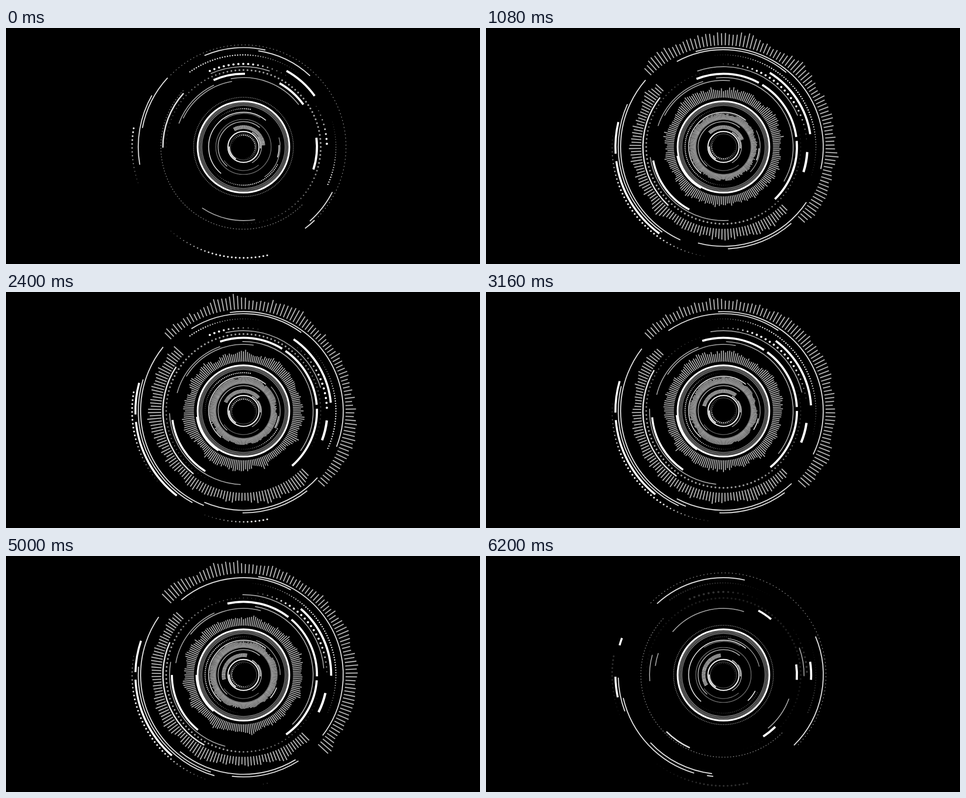
Write an HTML page with a canvas that moves like this. It is 1000 by 500 pixels and loops after 6.24 s.

```html
<!DOCTYPE html>
<html lang="en">
<head>
<meta charset="utf-8">
<title>Radial spectrum</title>
<style>
html, body { margin: 0; width: 100%; height: 100%; overflow: hidden; background: #000; }
canvas { display: block; width: 1000px; height: 500px; }
</style>
</head>
<body>
<canvas id="stage" width="1000" height="500"></canvas>
<script>
const LOOP = 6240, STEP = 40, SWEEP = 560, PULSE = 2040, LAST = LOOP - STEP;
const ctx = document.getElementById('stage').getContext('2d');
const rad = deg => deg * Math.PI / 180;
const clamp = v => Math.min(1, Math.max(0, v));
const smooth = v => v * v * (3 - 2 * v);
const mix = (a, b, k) => a + (b - a) * k;
let now = 0;

// grown: share of an arc drawn at the loop start; gone: share removed at its end.
const style = (width, color, grown, gone) => ({ width, color, grown, gone });
const SLOW = style(2.2, '#ddd', 0.3, 0.43);
const THIN = style(2.2, '#ddd', 0.5, 0.76);
const LONG = style(2.2, '#ddd', 0.5, 0.19);
const SHORT = style(2.2, '#ddd', 0.18, 0.91);
const FINE = style(1.9, '#a5a5a5', 0.5, 0.76);
const EARLY = style(1.9, '#a5a5a5', 0.81, 0);
const BOLD = style(4.5, '#fff', 0.5, 0.76);
const EDGE = style(4.2, '#fff', -0.145, 0.76);
const FRESH = style(4.2, '#fff', 0, 1);

function hash(a, b, seed) {
  const v = Math.sin(a * 127.1 + b * 311.7 + seed * 74.7) * 43758.5453;
  return v - Math.floor(v);
}

// Peaked along x, smooth in time; x wraps after n cells.
function noise(x, t, n, seed) {
  const i = Math.floor(x), j = Math.floor(t);
  const u = x - i, v = smooth(t - j);
  const at = p => mix(hash(p % n, j, seed), hash(p % n, j + 1, seed), v);
  return mix(at(i), at(i + 1), u);
}

function arc(r, from, to, width, color = '#fff') {
  ctx.beginPath();
  ctx.arc(0, 0, r, rad(Math.min(from, to)), rad(Math.max(from, to)));
  ctx.lineWidth = width;
  ctx.strokeStyle = color;
  ctx.stroke();
}

const ring = (r, width, color) => arc(r, 0, 360, width, color);

// An arc grows from its start angle, turns, and is cut from the start,
// or from the far end when it retreats.
function sweep(look, r, start, span, speed, retreat = false) {
  const head = clamp(look.grown + now / SWEEP);
  const cut = clamp(look.gone - (LAST - now) / SWEEP);
  const a = start + speed * now / 1000;
  const lo = retreat ? 0 : cut;
  const hi = retreat ? Math.min(head, 1 - cut) : head;
  if (hi > lo) arc(r, a + span * lo, a + span * hi, look.width, look.color);
}

// Spectrum bars every two degrees; flat bars remain as small dots.
function bars(r, start, count, width, reach, color = '#b0b0b0') {
  const level = smooth(clamp((now - 20) / 420)) * (1 - smooth(clamp((now - 5800) / 370)));
  ctx.beginPath();
  for (let i = 0; i < count; i++) {
    const a = rad(start + i * 2), c = Math.cos(a), s = Math.sin(a);
    const swell = noise(i / 5, now / 170, count / 5, r) ** 1.5;
    const spike = noise(i, now / 110, count, r + 5) ** 2;
    const end = r + 1.6 + level * reach * (0.38 + 0.45 * swell + 0.25 * spike);
    ctx.moveTo(c * r, s * r);
    ctx.lineTo(c * end, s * end);
  }
  ctx.lineWidth = width;
  ctx.strokeStyle = level < 0.1 ? '#777' : color;
  ctx.stroke();
}

// A soft window of brightness runs backwards along a row of dots.
function dots(r, start, span, pitch, light = 0.9) {
  const count = Math.round(rad(span) * r / pitch);
  const size = pitch * 0.35 + 1;
  const centre = 1.1 - now / PULSE;
  const fade = 1 - 0.8 * clamp((now - 5860) / 340);
  ctx.fillStyle = '#fff';
  for (let i = 0; i < count; i++) {
    const u = i / count;
    let d = u - centre;
    d = Math.abs(d - Math.round(d));
    const k = clamp((0.38 - d) / 0.24);
    if (k <= 0) continue;
    const a = rad(start + span * u);
    ctx.globalAlpha = light * fade * mix(0.2, 1, k);
    ctx.beginPath();
    ctx.arc(Math.cos(a) * r, Math.sin(a) * r, size * mix(0.45, 1, k) / 2, 0, 7);
    ctx.fill();
  }
  ctx.globalAlpha = 1;
}

function outerArcs() {
  sweep(SLOW, 210.5, 247, 119, 6.3);
  sweep(SLOW, 210.5, 27, 71, 6.3);
  sweep(SLOW, 217, 222.5, -106, -1.6);
  sweep(LONG, 206, 313, -68.5, -2.8);
  sweep(THIN, 222, 209.5, -78.5, -5, true);
  sweep(SHORT, 216, 46, 39, 2.3);

  sweep(EDGE, 228, 125, 46, 1.3);
  sweep(EDGE, 228, 175, 17, 1.3);

  // Three equal segments share one ring; the middle one repeats further out.
  for (let i = 0; i < 3; i++) sweep(BOLD, 155, 246 + 53.4 * i, 50.3, 2.28);
  sweep(BOLD, 185, 299.4, 49.7, 2.28);

  sweep({ ...THIN, width: 3 }, 170, 222, -85, -3.6);
  for (let i = 0; i < 2; i++) sweep(FINE, 156 + 14 * i, 81 + 165 * i, 86, 4.65);
  sweep(FINE, 147, 259.5, 126, 4);
  sweep(EARLY, 141, 205.5, 67.5, 2.4);
  sweep({ ...EARLY, gone: 0.8 }, 145, 200, 55, -2, true);

  sweep({ ...FRESH, width: 5 }, 177, 1, 14, 2.3);
  for (const r of [99, 151]) sweep(FRESH, r, 166, -50.5, 2.8);
}

function core() {
  const s = now / 1000, turn = -15 * s;
  ring(96.7, 3.8, '#fff');
  for (let i = 0; i < 3; i++) ring(93 - 2.6 * i, 1.3, '#999');

  arc(73.5, 130, 310, 1.9, '#ddd');
  arc(53.5, 130, 310, 1.8, '#aaa');
  arc(77.5, -15 - 11 * s, 55 - 11 * s, 1.4, '#aaa');
  arc(75, 357 + 4.8 * s, 377 + 4.8 * s, 2, '#ddd');
  arc(71, 235, 300, 1.2, '#999');
  ring(58.5, 1.2, '#666');
  arc(50, 50, 145, 1.2, '#777');

  // Hatched band
  ctx.setLineDash([1.5, 0.9]);
  arc(42, 242 + turn, 355 + turn, 8, '#ddd');
  ctx.setLineDash([]);

  arc(38, -35, 62, 1.5, '#aaa');
  arc(36, -60, 5, 1.8, '#ddd');
  ring(32.8, 2.5, '#eee');
  arc(30, 122, 182, 2.2, '#fff');
  ring(27.8, 0.9, '#777');
}

function draw(t) {
  now = t;
  ctx.setTransform(1, 0, 0, 1, 0, 0);
  ctx.fillStyle = '#000';
  ctx.fillRect(0, 0, 1000, 500);
  ctx.translate(501, 252);

  bars(215.5, 225, 90, 2.3, 32);
  bars(173.5, 45, 90, 2.3, 31);
  bars(104.5, 0, 180, 2, 28);
  bars(57.5, 0, 180, 1.5, 20, '#c8c8c8');
  // The innermost spectrum stays below its rim.
  ctx.globalCompositeOperation = 'destination-over';
  ctx.globalCompositeOperation = 'source-over';
  ring(76, 8, '#000');

  outerArcs();
  core();

  dots(195, 234.6, 151, 5.4);
  dots(176, 246.2, 115, 10.5, 1);
  dots(235, 77.7, 114, 8.3);
  dots(81, 28, 255, 4);
  dots(163, -81, 360, 8.5, 0.6);
  dots(25, -81, 360, 3.9);
}

const born = performance.now();
function tick() {
  const t = (performance.now() - born) % LOOP;
  draw(Math.floor(t / STEP) * STEP);
  requestAnimationFrame(tick);
}
tick();
</script>
</body>
</html>
```
